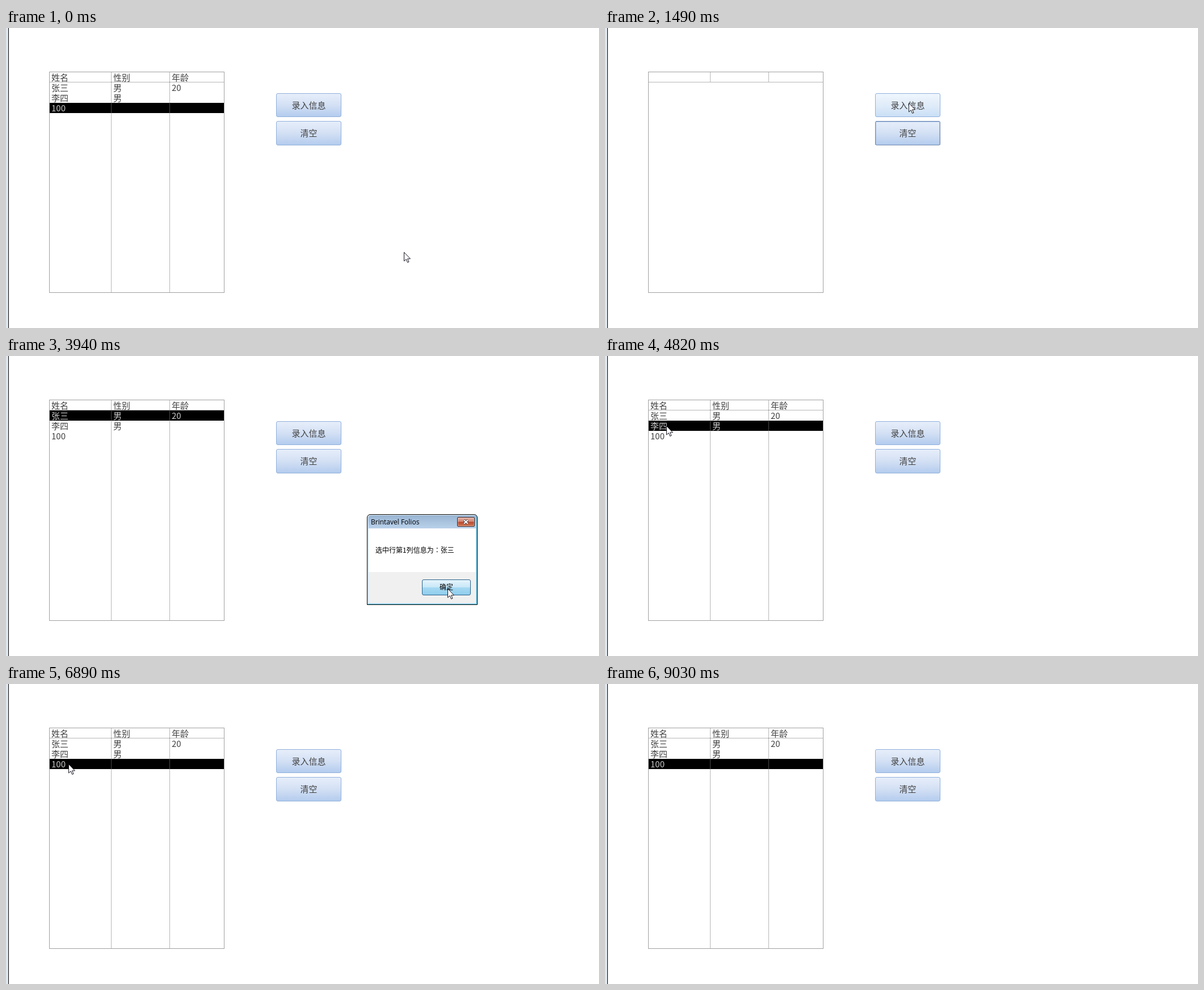
An HTML page that plays this animation: 1045 px wide and 529 px high, repeating every 9.11 s.

```html
<!DOCTYPE html>
<html lang="zh-CN">
<head>
<meta charset="utf-8">
<title>列表框</title>
<style>
  html, body { margin: 0; width: 100%; height: 100%; overflow: hidden; background: #fff; }
  body { position: relative; font: 15px "Noto Sans CJK SC", "Noto Sans CJK JP", sans-serif; color: #404040; }
  div, span, svg { position: absolute; box-sizing: border-box; white-space: nowrap; }

  #edge { left: 0; top: 0; width: 5px; height: 529px; background: #dfe6ee; border-right: 1px solid #000; }

  #list { left: 76px; top: 77px; width: 309px; height: 390px; border: 1px solid #a0a0a0; background: #fff; isolation: isolate; }
  .row { left: 0; width: 307px; height: 18px; line-height: 17px; }
  .row span:nth-child(1) { left: 3px; }
  .row span:nth-child(2) { left: 112px; }
  .row span:nth-child(3) { left: 215px; }
  .row.on { background: #000; color: #ccc; }
  .row.dots::after { content: ""; position: absolute; inset: 0; border: 1px dotted #fff; }
  .rule { top: 0; width: 1px; height: 388px; background: #484848; mix-blend-mode: difference; }
  #head { left: 0; top: 17px; width: 307px; height: 1px; background: #b7b7b7; }
  #list.empty .row { display: none; }
  #list.empty .rule { height: 17px; }

  .btn { left: 476px; width: 115px; border: 1px solid #8fb0dc; border-radius: 3px; line-height: 39px; text-align: center;
         background: linear-gradient(#e7eefa, #d3e0f4 50%, #b4ccee); }
  .btn.hover { background: linear-gradient(#eff6fd, #e0ecf9 50%, #cadff6); }
  .btn.down { background: linear-gradient(#a9c4e8, #c3d7f1); }
  .btn.focus { border: 1px dotted #1f3f74; box-shadow: inset 0 0 0 1px #a3bfe4; }

  #box { left: 636px; top: 279px; width: 195px; height: 160px; border: 1px solid #000; border-radius: 6px 6px 0 0;
         font-size: 12px; line-height: 17px; color: #000; background: linear-gradient(#98b4d2, #b9d1ea 24px);
         box-shadow: inset -1px -1px #5fd0ec, inset 1px 1px #e8f4fb; }
  #box.short { left: 637px; width: 192px; }
  #title { left: 6px; top: 4px; font-family: "Open Sans", sans-serif; }
  #close { right: 4px; top: 4px; width: 31px; height: 17px; border: 1px solid #43201c; border-radius: 2px;
           background: linear-gradient(#e3b0a4, #d08672 48%, #b8452c 52%, #cf7a55); box-shadow: inset 0 0 0 1px #ffffff55; }
  #close svg { left: 9px; top: 3px; fill: none; }
  #body { left: 2px; right: 2px; top: 24px; bottom: 2px; background: linear-gradient(#fff 77px, #f0f0f0 77px); }
  #msg { left: 14px; top: 53px; font-family: "Noto Sans CJK TC", "Noto Sans CJK SC", sans-serif; }
  #ok { right: 11px; top: 114px; width: 86px; height: 28px; padding-top: 3px; border: 1px solid #3c7fb1; border-radius: 3px;
        text-align: center; box-shadow: inset 0 0 0 1px #8fd8f5;
        background: linear-gradient(#f1f5f7, #e3edf2 48%, #cbe0e9 52%, #b6d5e2); }
  .short #ok { right: 12px; }
  #ok.hover { background: linear-gradient(#eaf6fd, #d9f0fc 48%, #bee6fd 52%, #a7d9f5); }
  #ok.down { border-color: #2c628b; box-shadow: none; background: linear-gradient(#e5f4fc, #c9e8f8 48%, #a6d9f3 52%, #8fcdec); }
  #cursor { left: 0; top: 0; overflow: visible; }
</style>
</head>
<body>
<div id="edge"></div>
<div id="list">
  <div id="head"></div>
  <div id="rows"></div>
  <div class="rule" style="left:108px"></div>
  <div class="rule" style="left:211px"></div>
</div>
<div class="btn" id="enter" style="top:115px;height:42px">录入信息</div>
<div class="btn" id="clear" style="top:164px;height:43px">清空</div>
<div id="box">
  <span id="title">Brintavel Folios</span>
  <div id="close"><svg width="11" height="9">
    <path d="M2 1.5l7 6M9 1.5l-7 6" stroke="#4a3a40" stroke-width="4"/>
    <path d="M2.2 1.5l6.6 6M8.8 1.5l-6.6 6" stroke="#fff" stroke-width="2.2"/>
  </svg></div>
  <div id="body"></div>
  <span id="msg" lang="zh-TW"></span>
  <div id="ok">确定</div>
</div>
<svg id="cursor" width="13" height="20"><path d="M.5 .5V16L4.2 12.7L6.6 18.4L9 17.4L6.6 11.9H11.5Z" fill="#fff" stroke="#15151f"/></svg>
<script>
const LOOP = 9110, STEP = 80;
const $ = id => document.getElementById(id);
const [list, enter, clear, box, msg, ok, cursor] = ['list', 'enter', 'clear', 'box', 'msg', 'ok', 'cursor'].map($);

const people = [['姓名', '性别', '年龄'], ['张三', '男', '20'], ['李四', '男', ''], ['100', '', '']];
const rows = people.map((cells, i) => {
  const row = document.createElement('div');
  row.className = 'row';
  row.style.top = i * 18 + 'px';
  row.innerHTML = cells.map(c => `<span>${c}</span>`).join('');
  $('rows').append(row);
  return row;
});

// Places the pointer visits
const spot = {
  start: [701, 395], clear: [540, 190], enter: [535, 132], ok: [778, 410], okTop: [768, 393], okEnd: [799, 410],
  row1: [231, 109], row2: [108, 123], row3: [110, 141], away: [885, 385]
};
// Moves: start time, number of steps, goal, sideways bow
const moves = [
  [70, 9, spot.clear], [1250, 4, spot.enter], [1960, 7, spot.row1, [0, 34]],
  [3220, 8, spot.ok], [4100, 10, spot.row2, [-352, 0]],
  [5210, 7, spot.ok], [6010, 8, spot.row3, [0, 24]],
  [7200, 8, spot.okTop], [7840, 4, spot.okEnd], [8160, 5, spot.away]
];
function pointer(t) {
  let pos = spot.start;
  for (const [at, steps, goal, bow = [0, 0]] of moves) {
    if (t < at) break;
    const k = Math.min(1, (Math.floor((t - at) / STEP) + 1) / steps);
    const p = 1 - (1 - k) ** 2.2;
    pos = pos.map((v, i) => v + (goal[i] - v) * p + 4 * p * (1 - p) * bow[i]);
  }
  return pos.map(Math.round);
}

// One visit per person: row picked, message opened and closed
const visits = [
  { pick: 2750, open: 2910, close: 4020 },
  { pick: 4820, open: 4900, close: 6010 },
  { pick: 6810, open: 6970, close: 8000 }
];
const within = (t, a, b) => t >= a && t < b;
const set = (el, state) => { for (const c in state) el.classList.toggle(c, state[c]); };

function hovered(el, x, y) {
  const r = el.getBoundingClientRect();
  return within(x, r.left, r.right) && within(y, r.top, r.bottom);
}

function draw(t) {
  const [x, y] = pointer(t);
  const count = visits.filter(v => v.pick <= t).length, visit = visits[count - 1];
  const picked = t < 1020 ? 3 : count;
  const open = visit && within(t, visit.open, visit.close);

  set(list, { empty: within(t, 1020, 1730) });
  rows.forEach((row, i) => {
    const on = i > 0 && i === picked;
    set(row, { on, dots: on && count > 0 && within(t, visit.close, 9030) });
  });

  set(enter, { hover: hovered(enter, x, y), down: within(t, 1570, 1650), focus: within(t, 1650, 2750) });
  set(clear, { hover: hovered(clear, x, y), down: within(t, 860, 940), focus: within(t, 860, 1650) });

  box.style.display = open ? '' : 'none';
  if (open) {
    const name = people[count][0];
    msg.textContent = '选中行第1列信息为：' + name;
    set(box, { short: !isNaN(name) });
    set(ok, { hover: hovered(ok, x, y), down: t >= visit.close - STEP });
  }

  cursor.style.display = t < 8560 ? '' : 'none';
  cursor.style.transform = `translate(${x}px, ${y}px)`;
}

let begin;
function frame(now) {
  begin ??= now;
  draw(Math.max(0, now - begin) % LOOP);
  requestAnimationFrame(frame);
}
draw(0);
requestAnimationFrame(frame);
</script>
</body>
</html>
```
